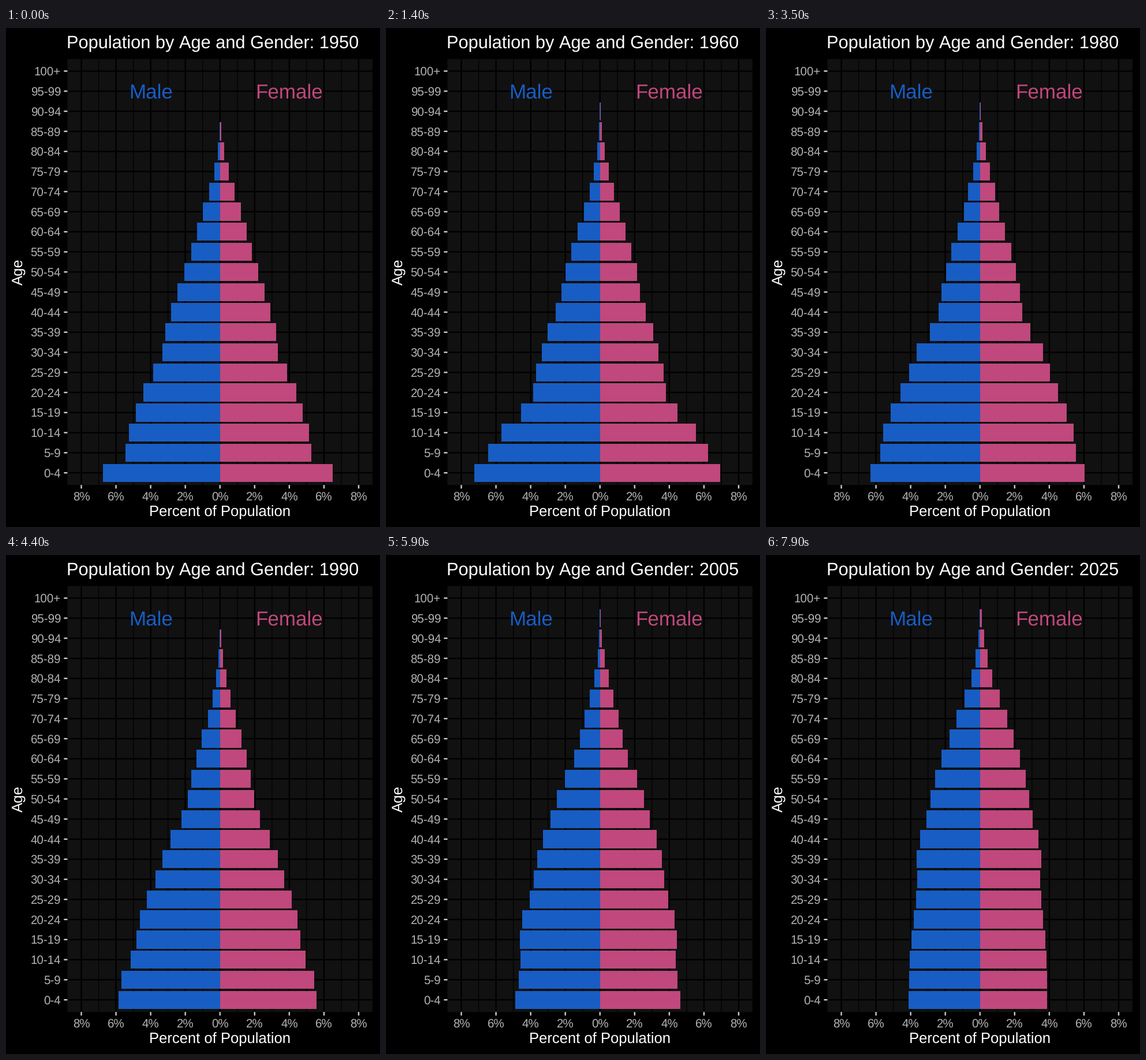
A matplotlib script for the animation above (8000 ms loop, 648 px wide and 864 px high).

```python
import numpy as np
import matplotlib.pyplot as plt
from matplotlib.animation import FuncAnimation
from matplotlib.patches import Rectangle

W, H = 648, 864
FRAMES, STEP_MS = 80, 100
RATE = 31 / 159                 # five-year states per frame
BLUE, PINK = "#185dc4", "#c0487c"
GREY, TICK_GREY = "#b3b3b3", "#cccccc"
CENTRE, UNIT = 370.75, 30.03    # zero line and pixels per percent
TOP, ROW = 74.6, 34.78          # y of the oldest group, row spacing
THICK = .9 * ROW
PANEL = (106.5, 53.7, 635.0, 791.2)
MAJOR, MINOR, TICK = 2.4, 1.2, 6.2
GROUPS, STATES = 21, 17

# (five-year state of birth, relative number of boys born)
BIRTHS = [(-20, 300), (-11, 286), (-7, 340), (-6, 334), (-4, 403), (-2, 438),
          (-1, 436), (0, 520), (1, 630), (2, 667), (4, 802), (5, 843),
          (6, 842), (8, 995), (9, 957), (10, 954), (13, 1044), (16, 1050)]

plt.rcParams["font.family"] = "Liberation Sans"
plt.rcParams["text.hinting"] = "none"


def bar_lengths():
    """Pixel lengths per frame: each cohort is born, ages a row per state, thins out."""
    state, age = np.mgrid[:STATES, :GROUPS]
    born = state - age
    boys = np.interp(born, *zip(*BIRTHS))
    girls = boys * (.96 - .0011 * np.maximum(born, 0))

    # Old-age mortality grows exponentially with age; both terms ease over time.
    loss = (.0063 - .00022 * state) * np.exp(.38 * age)
    loss += np.maximum(.036 - .0025 * state, .002) * age
    male = boys * np.exp(-loss)
    female = girls * np.exp(-loss * (.82 - .008 * state))

    scale = 100 * UNIT / (male + female).sum(axis=1, keepdims=True)
    x = np.arange(FRAMES) * RATE
    low = x.astype(int)
    part = (x - low)[:, None]
    return [t[low] * (1 - part) + t[low + 1] * part
            for t in (male * scale, female * scale)]


def box(x, y, w, h, color, z=1, snap=False):
    return ax.add_patch(Rectangle((x, y), w, h, fc=color, lw=0, snap=snap, zorder=z))


def unkerned(s):
    return s.replace(" ", "\u00a0")     # plain spaces would be kerned


def label(x, y, s, size, color="white", ha="center", **kw):
    return ax.text(x, y, unkerned(s), size=size, color=color, ha=ha,
                   va="baseline", zorder=5, **kw)


def row_y(age):
    return TOP + (GROUPS - 1 - age) * ROW


def bars(color):
    return [box(CENTRE, row_y(a) - THICK / 2, 0, THICK, color, 3, True)
            for a in range(GROUPS)]


fig = plt.figure(figsize=(W / 72, H / 72), dpi=72, facecolor="black")
ax = fig.add_axes([0, 0, 1, 1])
ax.set(xlim=(0, W), ylim=(H, 0))
ax.axis("off")

x0, y0, x1, y1 = PANEL
box(x0, y0, x1 - x0, y1 - y0, "#111111")

for p in range(-8, 9):
    x = CENTRE + p * UNIT
    lw = MINOR if p % 2 else MAJOR
    box(x - lw / 2, y0, lw, y1 - y0, "black")
    if p % 2 == 0:
        box(x - MAJOR / 2, y1, MAJOR, TICK, TICK_GREY)
        label(x, 817.5, f"{abs(p)}%", 20.5, GREY)

for age in range(GROUPS):
    y = row_y(age)
    name = "100+" if age == GROUPS - 1 else f"{5 * age}-{5 * age + 4}"
    box(x0, y - MAJOR / 2, x1 - x0, MAJOR, "black")
    box(x0 - TICK, y - MAJOR / 2, TICK, MAJOR, TICK_GREY)
    label(95, y + 7.4, name, 20.5, GREY, ha="right")

label(CENTRE - 4 * UNIT, 122, "Male", 35, BLUE)
label(CENTRE + 4 * UNIT, 122, "Female", 35, PINK)
label(CENTRE - .5, 846, "Percent of Population", 25.6)
label(30, 422.5, "Age", 25.6, rotation=90, rotation_mode="anchor")
title = label(104.8, 35, "", 30.72, ha="left")

male, female = bar_lengths()
left, right = bars(BLUE), bars(PINK)


def draw(i):
    year = 1950 + 5 * int(i * RATE)
    title.set_text(unkerned(f"Population by Age and Gender: {year}"))
    for a in range(GROUPS):
        left[a].set_x(CENTRE - male[i, a])
        left[a].set_width(male[i, a])
        right[a].set_width(female[i, a])
    return [title, *left, *right]


anim = FuncAnimation(fig, draw, frames=FRAMES, interval=STEP_MS,
                     repeat=True, repeat_delay=0, blit=False)
plt.show()
```
